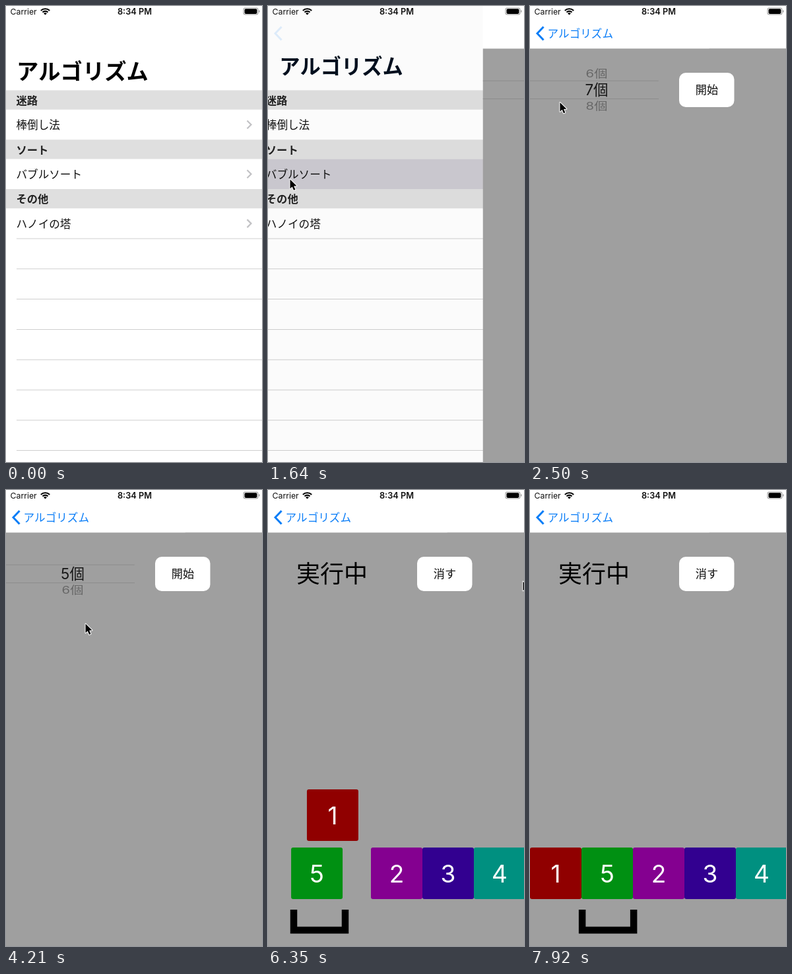
An HTML page with a canvas that plays this animation: 388x690 px, repeating every 8 s.

```html
<!DOCTYPE html>
<html lang="ja">
<head>
<meta charset="utf-8">
<style>
  html, body { margin: 0; width: 100%; height: 100%; overflow: hidden; background: #fff; }
  canvas { display: block; width: 388px; height: 690px; }
</style>
</head>
<body>
<canvas id="stage"></canvas>
<script>
const W = 388, H = 690, LOOP = 8000;
const canvas = document.getElementById('stage');
const ctx = canvas.getContext('2d');
const ratio = window.devicePixelRatio || 1;
canvas.width = W * ratio;
canvas.height = H * ratio;

const JP = '"Noto Sans CJK JP", "Noto Sans CJK", sans-serif';
const UI = 'Inter, ' + JP;
const TITLE = 'アルゴリズム';

const clamp = v => Math.max(0, Math.min(1, v));
const lerp = (a, b, p) => a + (b - a) * p;
const ease = v => (v = clamp(v)) < 0.5 ? 2 * v * v : 1 - 2 * (1 - v) ** 2;

// Keyframes are [time, value, ...]; values are interpolated linearly.
function track(keys, t) {
  if (t <= keys[0][0]) return keys[0].slice(1);
  for (let i = 1; i < keys.length; i++) {
    const a = keys[i - 1], b = keys[i];
    if (t <= b[0]) return a.slice(1).map((v, j) => lerp(v, b[j + 1], (t - a[0]) / (b[0] - a[0])));
  }
  return keys[keys.length - 1].slice(1);
}

const POINTER = [
  [500, 33, 269], [920, 33, 262], [1930, 33, 262], [2500, 45, 145], [2640, 45, 145],
  [2920, 108, 118], [3070, 108, 118], [3210, 110, 165], [3350, 111, 220], [3500, 111, 220],
  [3780, 112, 218], [4060, 114, 212], [4210, 120, 202], [4500, 229, 162], [4640, 229, 162],
  [4780, 246, 148], [4930, 246, 148], [5070, 255, 141], [5640, 255, 141], [6350, 386, 138], [6490, 400, 138]
];
const WHEEL = [[3070, 7], [3210, 5.3], [3350, 4.4], [3500, 4.4], [3640, 4.6], [3920, 5]];
const PUSH = { start: 1500, length: 500 };
const SWAP = { start: 5676, length: 1500 };
const BRACKET = { start: 7337, length: 1150 };
const TILES_AT = 5210;
const progress = (span, t) => clamp((t - span.start) / span.length);

function rect(x, y, w, h, color, radius = 0) {
  ctx.fillStyle = color;
  ctx.beginPath();
  ctx.roundRect(x, y, w, h, radius);
  ctx.fill();
}

function line(points, color, width, cap = 'butt') {
  ctx.strokeStyle = color;
  ctx.lineWidth = width;
  ctx.lineCap = cap;
  ctx.beginPath();
  points.forEach(([x, y]) => ctx.lineTo(x, y));
  ctx.stroke();
}

// Text is centred vertically on y.
function text(str, x, y, size, { color = '#111', weight = 400, align = 'left', font = JP } = {}) {
  ctx.font = `${weight} ${size}px ${font}`;
  ctx.textAlign = align;
  ctx.fillStyle = color;
  ctx.fillText(str, x, y + size * 0.37);
}

function drawList(selected) {
  rect(0, 0, W, H, '#fff');
  [['迷路', '棒倒し法'], ['ソート', 'バブルソート'], ['その他', 'ハノイの塔']].forEach(([head, item], i) => {
    const y = 127.5 + i * 74.8;
    if (selected && i === 1) rect(-30, y + 29, W + 60, 46, '#cccad1');
    rect(-30, y, W + 60, 29.2, '#dfdfdf');
    text(head, 15.5, y + 15.3, 16.3, { weight: 700, color: '#222' });
    text(item, 15.5, y + 52.3, 16.6);
    line([[365.5, y + 46], [371.5, y + 52], [365.5, y + 58]], '#c2c2c5', 2.2);
  });
  for (let i = 0; i < 8; i++) rect(16, 351.5 + i * 45.8, W, 1, '#cfcfcf');
}

function drawWheel(position) {
  rect(0, 112.8, 195, 1, '#8c8c8c');
  rect(0, 140, 195, 1, '#8c8c8c');
  for (let n = 5; n <= 9; n++) {
    const offset = n - position, distance = Math.abs(offset), angle = offset * 0.8;
    if (distance > 1.8) continue;
    ctx.save();
    ctx.translate(101, 127 + 34 * Math.sin(angle));
    ctx.scale(1 - 0.1 * Math.min(1, distance), Math.cos(angle));
    ctx.globalAlpha = Math.max(0.1, 0.85 - 0.5 * distance);
    text(n + '個', 0, 0, 22.5, { color: '#000', align: 'center', font: UI });
    ctx.restore();
  }
}

function drawTile(label, color, x, y) {
  rect(x, y, 78, 78, color, 3);
  text(label, x + 39, y + 39.3, 37, { color: '#fff', align: 'center', font: UI });
}

function drawSort(t) {
  const swap = progress(SWAP, t);
  const stage = i => ease(swap * 3 - i);
  drawTile('5', '#009012', 78 * swap, 541);
  drawTile('2', '#840090', 156, 541);
  drawTile('3', '#320090', 234, 541);
  drawTile('4', '#009080', 312, 541);
  drawTile('1', '#900000', 78 * (1 - stage(1)), 541 - 88 * (stage(0) - stage(2)));
  const x = 34 + 78 * ease(progress(BRACKET, t));
  line([[x + 5, 635], [x + 5, 666], [x + 83, 666], [x + 83, 635]], '#000', 10.5);
}

function drawDetail(t) {
  const running = t >= SWAP.start;
  rect(0, 0, W, 64.5, '#fff');
  rect(0, 64.5, W, H, '#9f9f9f');
  if (running) text('実行中', 97, 127, 36, { color: '#000', align: 'center' });
  else drawWheel(track(WHEEL, t)[0]);
  rect(226, 101, 83.5, 52, '#fff', 10);
  text(running ? '消す' : '開始', 268, 127, 17.2, { align: 'center' });
  if (t >= TILES_AT) drawSort(t);
}

function drawTitle(push) {
  const p = push ** 1.15;
  const color = `rgb(${10 * p}, ${125 * p}, ${247 * p})`;
  text(TITLE, lerp(16, 26.5, p), lerp(98.5, 42, p), lerp(33.3, 16.6, p), { color, weight: p < 0.5 ? 700 : 400 });
  ctx.globalAlpha = p;
  line([[20.5, 31.5], [11, 41.5], [20.5, 51.5]], '#0a7df7', 3);
  ctx.globalAlpha = 1;
}

function drawStatusBar() {
  text('Carrier', 6.5, 8.7, 12.3, { font: UI });
  text('8:34 PM', 195, 8.7, 12.8, { font: UI, weight: 600, align: 'center' });
  [[1.7, 3.4], [5.7, 2.1], [9.4, 2.1]].forEach(([radius, width]) => {
    ctx.strokeStyle = '#000';
    ctx.lineWidth = width;
    ctx.lineCap = 'butt';
    ctx.beginPath();
    ctx.arc(59.5, 13.6, radius, -Math.PI * 0.75, -Math.PI * 0.25);
    ctx.stroke();
  });
  rect(359.5, 2.5, 23, 11, '#a0a0a0', 3.2);
  rect(360.5, 3.5, 21, 9, '#fff', 2.4);
  rect(361.5, 4.3, 19, 7.6, '#000', 1.8);
  rect(383, 6.2, 1.5, 3.6, '#a0a0a0', 1);
}

function drawPointer(x, y) {
  ctx.save();
  ctx.translate(x, y);
  ctx.beginPath();
  [[0.5, 0.5], [0.5, 14.3], [3.7, 11.4], [6, 16.8], [8.4, 15.8], [6.1, 10.5], [10.4, 10.3]]
    .forEach(([px, py]) => ctx.lineTo(px, py));
  ctx.closePath();
  ctx.lineJoin = 'round';
  ctx.lineWidth = 2;
  ctx.strokeStyle = '#fff';
  ctx.fillStyle = '#000';
  ctx.stroke();
  ctx.fill();
  ctx.restore();
}

function draw(t) {
  const push = ease(progress(PUSH, t));
  ctx.setTransform(ratio, 0, 0, ratio, 0, 0);
  ctx.save();
  ctx.translate(-0.3 * W * push, 0);
  drawList(t >= PUSH.start);
  ctx.restore();
  rect(0, 0, W, H, `rgba(0, 0, 0, ${0.1 * push})`);
  if (push > 0) {
    ctx.save();
    ctx.translate(W * (1 - push), 0);
    drawDetail(t);
    ctx.restore();
  }
  drawTitle(push);
  drawStatusBar();
  if (t >= 500) drawPointer(...track(POINTER, t));
}

// The picture advances in steps, about seven per second.
function stepped(t) {
  const step = 142.7;
  return t < 500 ? 0 : 500 + Math.floor((t - 492) / step) * step;
}

function tick() {
  draw(stepped(performance.now() % LOOP));
  requestAnimationFrame(tick);
}
tick();
</script>
</body>
</html>
```
